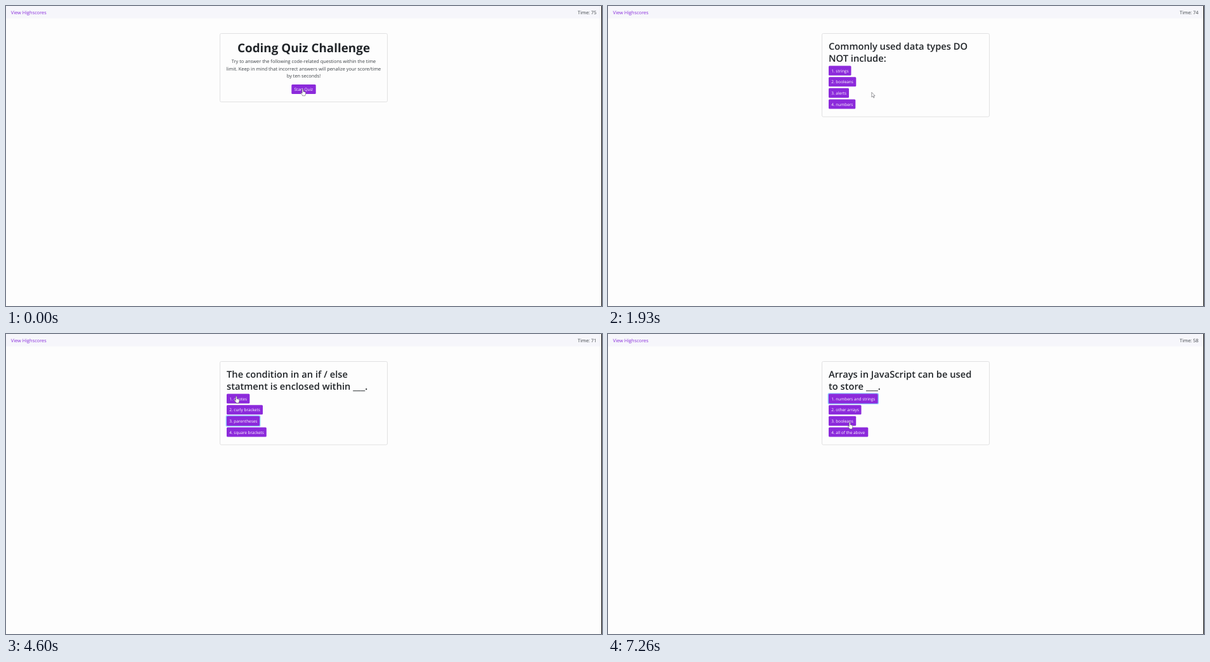
An HTML page for the animation above (8000 ms loop, 940 by 474 pixels).

```html
<!DOCTYPE html>
<html lang="en">
<head>
<meta charset="utf-8">
<title>Coding Quiz Challenge</title>
<style>
  html, body { margin: 0; width: 100%; height: 100%; overflow: hidden; background: #fdfdfd; }
  svg { display: block; width: 100%; height: 100%; }
  text { font: 400 7.4px "Open Sans", "Noto Sans", sans-serif; fill: #3b4045; text-rendering: geometricPrecision; white-space: pre; }
  .link { fill: #8a2fdc; }
  .title { font-size: 18.85px; font-weight: 700; fill: #212529; }
  .question { font-size: 14.72px; font-weight: 600; fill: #212529; }
  .label { font-size: 6.43px; fill: #fff; }
  .feedback { font-size: 7.6px; font-style: italic; fill: #767b81; }
  .mid { text-anchor: middle; }
  .end { text-anchor: end; }
  .button { fill: #8c2adb; }
  .ring { fill: #92c7ff; }
  .line { fill: none; stroke: #e1e1e2; }
  .cursor { fill: #fff; stroke: #55555c; stroke-width: .6; stroke-linejoin: round; }
</style>
</head>
<body>
<svg id="stage" viewBox="0 0 940 474">
  <rect width="940" height="474" fill="#fdfdfd"/>
  <rect width="940" height="19.5" fill="#f6f6fb"/>
  <text class="link" x="7.8" y="12.8">View Highscores</text>
  <text class="end" id="timer" x="931.2" y="12.8"></text>
  <rect class="line" id="card" x="337.5" y="43.5" width="264" height="108" rx="2"/>
  <g id="content"></g>
  <g id="note">
    <path class="line" d="M348 172.5H592"/>
    <text class="feedback" id="verdict" x="348" y="190"></text>
  </g>
  <path class="cursor" id="hand" d="M-.9 .9Q-.9 0 0 0T.9 .9V4L3.6 4.6Q4.6 4.9 4.6 6V7.5Q4.6 8.6 3.8 9.8V10.6H-.4V9.8L-2.9 6.8Q-3.2 5.7 -2.2 5.8L-.9 6.8Z"/>
  <path class="cursor" id="arrow" d="M0 0V7.6L1.8 6L3 8.7L4.2 8.2L3 5.5H5.3Z"/>
  <rect x="939" width="1" height="474" fill="#000"/>
</svg>
<script>
const LOOP = 8000, FRAME = 200 / 3;
const $ = id => document.getElementById(id);

// Each answer is [label, button width].
const scenes = [
  { from: 0, bottom: 151.5 },
  { from: 130, bottom: 175, lines: ["Commonly used data types DO", "NOT include:"],
    answers: [["strings", 35.5], ["booleans", 43.3], ["alerts", 32], ["numbers", 42.3]] },
  { from: 3000, bottom: 175, verdict: "Correct!",
    lines: ["The condition in an if / else", "statment is enclosed within ___."],
    answers: [["quotes", 36.3], ["curly brackets", 57], ["parentheses", 52], ["square brackets", 62.8]] },
  { from: 5400, bottom: 175, verdict: "Wrong!",
    lines: ["Arrays in JavaScript can be used", "to store ___."],
    answers: [["numbers and strings", 77.6], ["other arrays", 51.5], ["booleans", 43.2], ["all of the above", 62.3]] }
];
const VERDICT_TIME = 330;

// Mouse presses that move the focus ring: [time, scene range, button].
const presses = [
  { at: 60, until: 130, button: 0 },
  { at: 2660, until: 5060, button: 2 },
  { at: 5060, until: LOOP, button: 0 }
];

const easeIn = u => u * u;
const easeOut = u => 1 - (1 - u) * (1 - u);
const easeBoth = u => u * u * (3 - 2 * u);

// Pointer tip: [time, x, y, easing towards this point].
const path = [
  [0, 468, 131.2],
  [1066, 468, 131.2, easeBoth],
  [1933, 416, 136.4, easeIn],
  [2466, 372, 140, easeOut],
  [3933, 372, 140, easeBoth],
  [4000, 373.3, 140, easeIn],
  [4466, 363, 99.2, easeBoth],
  [4540, 363, 99.2, easeBoth],
  [4600, 363.3, 98.5, easeBoth],
  [6266, 363.3, 98.5, easeBoth],
  [7133, 381, 138.5, easeBoth],
  [7200, 381, 138.5, easeBoth],
  [7260, 381.3, 139.5, easeBoth]
];

const text = (cls, x, y, s) => `<text class="${cls}" x="${x}" y="${y}">${s}</text>`;

function buttonsOf(scene) {
  if (!scene.answers) return [{ x: 450.3, y: 124, w: 38.4, label: "Start Quiz" }];
  return scene.answers.map(([label, w], i) =>
    ({ x: 348, y: 94.6 + i * 17.63, w, label: `${i + 1}. ${label}` }));
}

function box(cls, b, grow, extra = "") {
  return `<rect class="${cls}" x="${b.x - grow}" y="${b.y - grow}" width="${b.w + 2 * grow}"
    height="${15.1 + 2 * grow}" rx="${1.5 + grow / 2}" ${extra}/>`;
}

function contentOf(scene, focus) {
  const head = scene.lines
    ? scene.lines.map((s, i) => text("question", 348, 69.2 + i * 18.8, s))
    : [text("title mid", 469.5, 73.1, "Coding Quiz Challenge"),
       ...["Try to answer the following code-related questions within the time",
           "limit. Keep in mind that incorrect answers will penalize your score/time",
           "by ten seconds!"].map((s, i) => text("mid", 469.5, 89.9 + i * 11.75, s))];
  const buttons = buttonsOf(scene).map((b, i) =>
    (focus.button === i ? box("ring", b, 1.4, `opacity="${focus.alpha}"`) : "") +
    box("button", b, 0) + text("label", b.x + 4.3, b.y + 10.1, b.label));
  return head.concat(buttons).join("");
}

function pointerAt(t) {
  const next = path.findIndex(p => p[0] > t);
  if (next < 0) return path[path.length - 1].slice(1, 3);
  const [t0, x0, y0] = path[next - 1], [t1, x1, y1, ease] = path[next];
  const u = ease((t - t0) / (t1 - t0));
  return [x0 + (x1 - x0) * u, y0 + (y1 - y0) * u];
}

let drawn = "";

function render(now) {
  // The picture advances on a 15 per second grid.
  const t = Math.floor((now % LOOP + 7) / FRAME) * FRAME + .5;
  const scene = scenes.filter(s => t >= s.from).pop();
  const press = presses.find(p => t >= p.at && t < p.until);
  const focus = press
    ? { button: press.button, alpha: Math.min(1, (t - press.at + 30) / 180).toFixed(2) }
    : { button: -1, alpha: 0 };

  const key = [scene.from, focus.button, focus.alpha].join();
  if (key !== drawn) {
    $("content").innerHTML = contentOf(scene, focus);
    drawn = key;
  }

  const noted = scene.verdict && t < scene.from + VERDICT_TIME;
  $("note").style.display = noted ? "" : "none";
  $("verdict").textContent = noted ? scene.verdict : "";
  $("card").setAttribute("height", (noted ? 202.5 : scene.bottom) - 43.5);

  const ticks = Math.max(0, Math.floor((t - 130) / 1000));
  $("timer").textContent = "Time: " + (75 - ticks - (t >= 6130 ? 10 : 0));

  const [x, y] = pointerAt(t);
  const over = t < 1130 || buttonsOf(scene).some(b =>
    x >= b.x && x <= b.x + b.w && y >= b.y && y <= b.y + 15.1);
  for (const [id, on] of [["hand", over], ["arrow", !over]]) {
    $(id).style.display = on ? "" : "none";
    $(id).setAttribute("transform", `translate(${x.toFixed(2)} ${y.toFixed(2)})`);
  }
}

const start = performance.now();
function loop() {
  render(performance.now() - start);
  requestAnimationFrame(loop);
}
loop();
</script>
</body>
</html>
```
